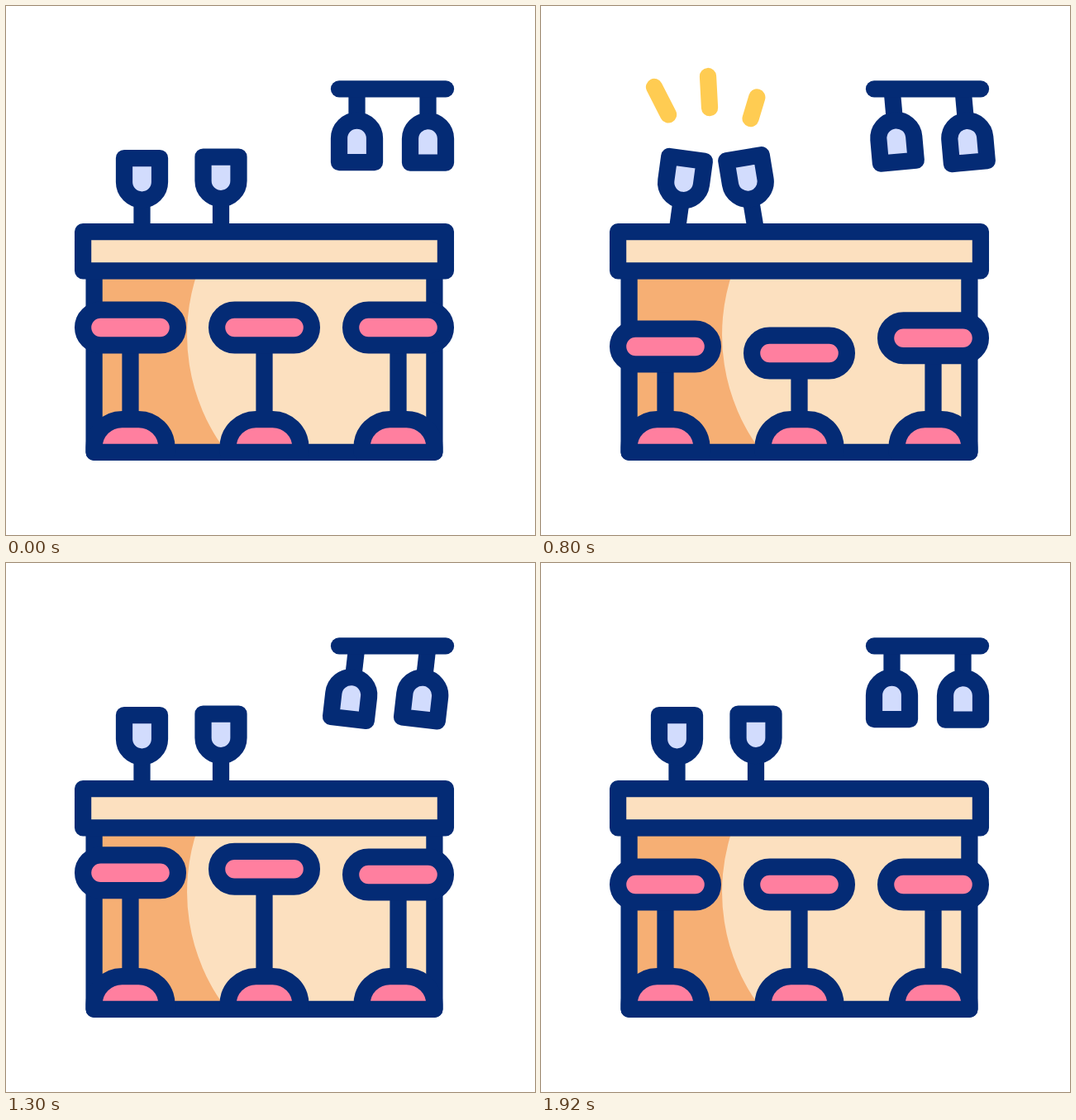
These frames come from a looping animation (640x640 px, 2200 ms). An HTML page:

```html
<!DOCTYPE html>
<html lang="en">
<head>
<meta charset="utf-8">
<title>Bar counter</title>
<style>
  html, body { margin: 0; width: 100%; height: 100%; overflow: hidden; background: #fff; }
  svg { display: block; width: 100%; height: 100%; }
</style>
</head>
<body>
<svg viewBox="0 0 640 640" fill="none" stroke="#042b75" stroke-width="20.25" stroke-linecap="round" stroke-linejoin="round">
  <defs>
    <!-- Glass with its foot at the origin -->
    <g id="glass">
      <path d="M0 0V-40" stroke-linecap="butt"/>
      <path d="M-21.5 -89V-60a21.5 21.5 0 0 0 43 0V-89Z" fill="#d2dcfd"/>
    </g>
    <g id="seat">
      <path d="M0 410V560" stroke-linecap="butt"/>
      <rect x="-57.4" y="367.6" width="114.8" height="42.8" rx="21.4" fill="#ff7f9f"/>
    </g>
    <path id="base" d="M-43.9 539.9v-6a33.9 33.9 0 0 1 33.9 -33.9h20a33.9 33.9 0 0 1 33.9 33.9v6Z" fill="#ff7f9f"/>
    <clipPath id="floor"><rect width="640" height="505"/></clipPath>
  </defs>

  <g id="sparks" stroke="#ffcc52">
    <path d="M162 147L137 98"/>
    <path d="M205 141L202 85"/>
    <path d="M250 148L261.3 110.5"/>
  </g>

  <use href="#glass" class="glass"/>
  <use href="#glass" class="glass"/>
  <use href="#glass" class="glass"/>
  <use href="#glass" class="glass"/>
  <path d="M403 100.4H532"/>

  <path d="M106.6 320H518.4V539.9H106.6Z" fill="#fce0bf" stroke="none"/>
  <path d="M106.6 320H232.4A234 234 0 0 0 267 539.9H106.6Z" fill="#f6af74" stroke="none"/>
  <path d="M106.6 320H518.4V539.9H106.6Z"/>
  <rect x="93.1" y="273.1" width="438.8" height="47.2" fill="#fce0bf"/>

  <g clip-path="url(#floor)">
    <use href="#seat" class="seat"/>
    <use href="#seat" class="seat"/>
    <use href="#seat" class="seat"/>
  </g>
  <use href="#base" x="150.5"/>
  <use href="#base" x="312.5"/>
  <use href="#base" x="474.5"/>
</svg>
<script>
const LOOP = 2200;
const glasses = document.querySelectorAll('.glass');
const seats = document.querySelectorAll('.seat');
const sparkGroup = document.getElementById('sparks');
const sparks = [...sparkGroup.children].map(el => ({ el, len: el.getTotalLength() }));

// Sine-eased value through [time, value] keys
function tween(t, keys) {
  if (t <= keys[0][0]) return keys[0][1];
  for (let i = 1; i < keys.length; i++) {
    const [t0, a] = keys[i - 1], [t1, b] = keys[i];
    if (t < t1) return a + (b - a) * (1 - Math.cos(Math.PI * (t - t0) / (t1 - t0))) / 2;
  }
  return keys[keys.length - 1][1];
}

const bounce = [[-15, 0], [320, 32], [800, -19.5], [1320, 0]];
const swing = [[400, 0], [620, 7.1], [940, -13.1], [1300, 6.5], [1820, 0]];
const clink = [[325, 0], [640, 1], [1095, 0]];
const sparkTip = [[540, 0], [680, 1]];
const sparkTail = [[740, 0], [900, 1]];

function place(el, x, y, angle) {
  el.setAttribute('transform', `translate(${x} ${y}) rotate(${angle})`);
}

function draw(t) {
  const tilt = tween(t, clink), sway = tween(t, swing);
  place(glasses[0], 164.5, 273, 10.8 * tilt);
  place(glasses[1], 260, 271.5, -13 * tilt);
  place(glasses[2], 424.5, 100, 180 + sway);
  place(glasses[3], 510.5, 100.5, 180 + sway);

  seats.forEach((seat, i) =>
    place(seat, 150.5 + 162 * i, tween(t - 600 + 160 * i, bounce), 0));

  const tip = tween(t, sparkTip), tail = tween(t, sparkTail);
  sparkGroup.style.display = tip > tail ? '' : 'none';
  for (const { el, len } of sparks) {
    el.style.strokeDasharray = `${(tip - tail) * len} ${len * 2}`;
    el.style.strokeDashoffset = -tail * len;
  }
}

const start = performance.now();
function tick() {
  draw((performance.now() - start) % LOOP);
  requestAnimationFrame(tick);
}
draw(0);
requestAnimationFrame(tick);
</script>
</body>
</html>
```
